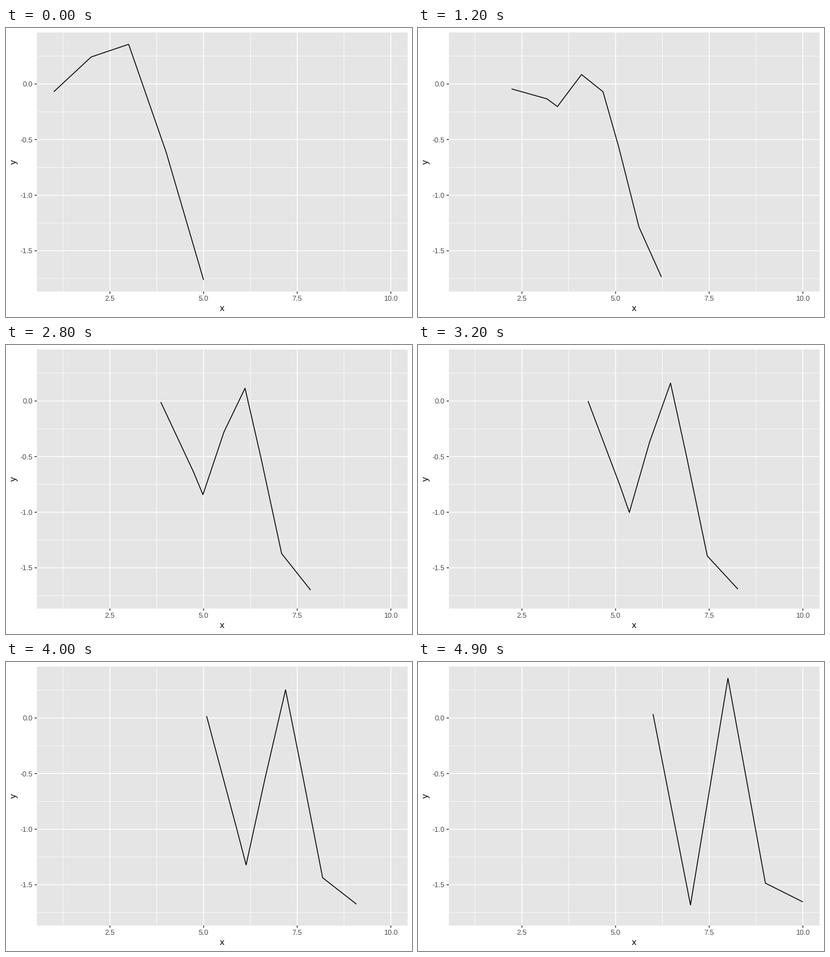
A matplotlib script that plays this animation: 672 by 480 pixels, repeating every 5000 ms.

```python
import numpy as np
import matplotlib.pyplot as plt
from matplotlib.animation import FuncAnimation
from matplotlib.patches import Rectangle

WIDTH, HEIGHT, DPI = 672, 480, 96
FRAMES, INTERVAL = 50, 100
LEFT, TOP, RIGHT, BOTTOM = 51.1, 7.4, 664.7, 437.7
TICK = 3.67
THICK, THIN = 1.42, 0.71

plt.rcParams["font.family"] = "Liberation Sans"
plt.rcParams["text.hinting"] = "none"
plt.rcParams["text.hinting_factor"] = 1


def px(x):
    return 172.0 + (np.asarray(x) - 2.5) * 62.0


def py(y):
    return 93.0 - np.asarray(y) * 184.7


fig = plt.figure(figsize=(WIDTH / DPI, HEIGHT / DPI), dpi=DPI, facecolor="white")
ax = fig.add_axes([0, 0, 1, 1])
ax.set_xlim(0, WIDTH)
ax.set_ylim(HEIGHT, 0)
ax.axis("off")


def stroke(xs, ys, color, width, z):
    line, = ax.plot(xs, ys, color=color, lw=width * 72 / DPI, zorder=z,
                    solid_capstyle="butt", solid_joinstyle="round", snap=False)
    return line


def label(x, y, text, size=8.8, color="#4D4D4D", **kw):
    ax.text(x, y, text, fontsize=size, color=color, va="baseline", **kw)


def grid(xs, ys, width, z):
    for x in px(xs):
        stroke([x, x], [TOP, BOTTOM], "white", width, z)
    for y in py(ys):
        stroke([LEFT, RIGHT], [y, y], "white", width, z)


x_breaks = [2.5, 5.0, 7.5, 10.0]
y_breaks = [0.0, -0.5, -1.0, -1.5]

ax.add_patch(Rectangle((LEFT, TOP), RIGHT - LEFT, BOTTOM - TOP,
                       fc="#E5E5E5", ec="none", snap=False, zorder=0))
grid([1.25, 3.75, 6.25, 8.75], [0.25, -0.25, -0.75, -1.25, -1.75], THIN, 1)
grid(x_breaks, y_breaks, THICK, 2)

for value in x_breaks:
    x = px(value)
    stroke([x, x], [BOTTOM, BOTTOM + TICK], "#333333", THICK, 3)
    label(x, 453, f"{value:.1f}", ha="center")
for value in y_breaks:
    y = py(value)
    stroke([LEFT - TICK, LEFT], [y, y], "#333333", THICK, 3)
    label(44.5, y + 4.3, f"{value:.1f}", ha="right")

label(357.9, 469.6, "x", 11, "black", ha="center")
ax.text(17.7, 222.6, "y", fontsize=11, color="black", rotation=90,
        rotation_mode="anchor", ha="center", va="baseline")

# Each path gains points where the other one has a vertex.
start_y = [-0.07, 0.243, 0.357, -0.612, -1.762]
end_y = [0.036, -1.681, 0.357, -1.485, -1.654]
start_at = np.array([0, 1, 1.295, 2, 2.583, 3, 3.53, 4])
end_at = np.array([0, 0.775, 1, 1.455, 2, 2.42, 3, 4])


def path(ys, at, first_x):
    return np.array([px(first_x + at), py(np.interp(at, range(5), ys))])


start = path(start_y, start_at, 1)
end = path(end_y, end_at, 6)
curve = stroke(*start, "black", THICK, 4)


def update(frame):
    t = frame / (FRAMES - 1)
    curve.set_data(*(start + (end - start) * t))
    return curve,


anim = FuncAnimation(fig, update, frames=FRAMES, interval=INTERVAL,
                     repeat=True, repeat_delay=0, blit=False)
plt.show()
```
